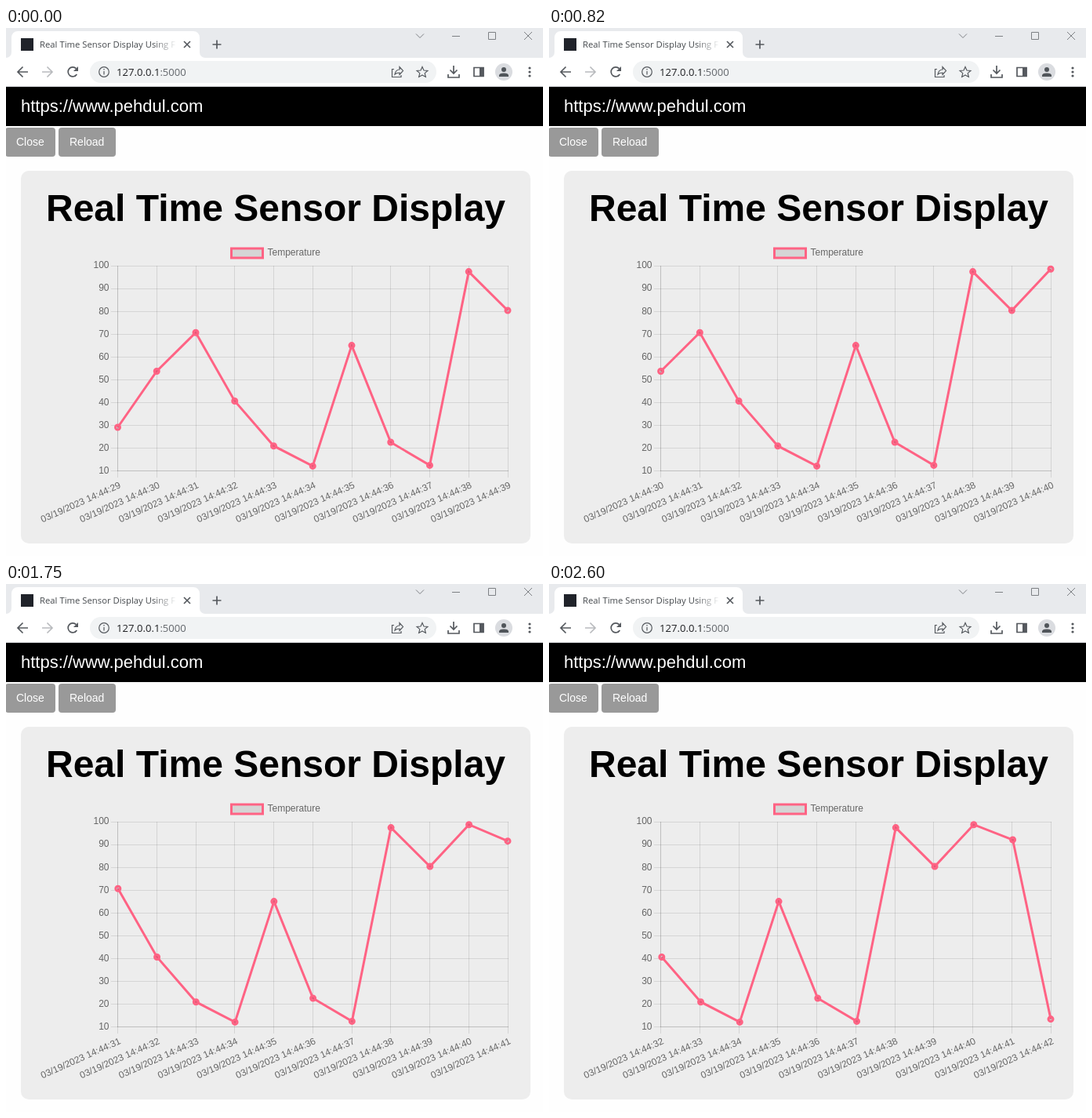
These frames come from a looping animation (685 by 673 pixels, 2.68 s). An HTML page:

```html
<!DOCTYPE html>
<html lang="en">
<head>
<meta charset="utf-8">
<title>Real Time Sensor Display</title>
<style>
  html, body { margin: 0; width: 100%; height: 100%; overflow: hidden; background: #fefefe; }
  svg { display: block; font-family: "Liberation Sans", Arial, sans-serif; }
  .ui { font-family: "Open Sans", "Noto Sans", sans-serif; }
  .icon { fill: none; stroke: #55595e; stroke-width: 1.7; }
  .fine { stroke-width: 1.2; }
  .thin { fill: none; stroke: #7d8084; stroke-width: 1; }
  .btn { font-size: 14px; fill: #fff; }
  .small { font-size: 12px; fill: #666; }
  .end { text-anchor: end; }
  #grid path { stroke: #000; stroke-opacity: .1; fill: none; }
  #line { fill: none; stroke: #ff6384; stroke-width: 3; }
  #dots circle { fill: rgba(0, 0, 0, .1); stroke: #ff6384; stroke-width: 3; }
</style>
</head>
<body>
<svg width="685" height="673" viewBox="0 0 685 673">
  <defs>
    <linearGradient id="fade" gradientUnits="userSpaceOnUse" x1="188" x2="218" y1="0" y2="0">
      <stop offset="0" stop-color="#45494d"/>
      <stop offset="1" stop-color="#45494d" stop-opacity="0"/>
    </linearGradient>
    <clipPath id="face"><circle cx="635" cy="56" r="11"/></clipPath>
  </defs>

  <!-- Tab strip -->
  <rect width="685" height="38" fill="#e8eaed"/>
  <path d="M0 38a7 7 0 0 0 7-7V12a8 8 0 0 1 8-8H239a8 8 0 0 1 8 8V31a7 7 0 0 0 7 7Z" fill="#fff"/>
  <rect x="19" y="13" width="16" height="16" fill="#20232a"/>
  <text class="ui" x="43" y="25" font-size="11.3" fill="url(#fade)">Real Time Sensor Display Using F</text>
  <path class="icon" d="M227 17l8 8m0-8l-8 8M263.500 21h11m-5.500-5.500v11"/>
  <path class="thin" d="M523 7.500l5 5 5-5M569 10.500h10M615.500 5.500h9v9h-9ZM661 5l10 10m0-10l-10 10"/>

  <!-- Toolbar -->
  <rect y="38" width="685" height="37" fill="#fff"/>
  <rect y="74" width="685" height="1" fill="#dadce0"/>
  <path class="icon" d="M28 56H15m6.500-6.500L15 56l6.500 6.500"/>
  <path class="icon" style="stroke:#b9bbbe" d="M46 56h13m-6.500-6.500L59 56l-6.500 6.500"/>
  <path class="icon" d="M90.300 59a6 6 0 1 1-.8-7.300"/>
  <path d="M92 49v6h-6Z" fill="#55595e"/>
  <rect x="107" y="42" width="442" height="28" rx="14" fill="#f1f3f4"/>
  <circle class="icon fine" cx="125" cy="56" r="6.300"/>
  <path class="icon fine" d="M125 55v4.500m0-7.500v1.600"/>
  <text class="ui" x="141" y="61" font-size="13.1" fill="#202124">127.0.0.1<tspan fill="#63676c">:5000</tspan></text>
  <path class="icon fine" d="M495 52.500h-2.500v10h11.500V60M496 59q1-6 6-6v-3.500l4.500 5-4.500 5V57q-4 0-6 2Z"/>
  <path class="icon fine" d="M531 49.500l2 4.500 4.900.4-3.700 3.200 1.100 4.800-4.300-2.500-4.300 2.500 1.100-4.800-3.700-3.200 4.900-.4Z"/>
  <path class="icon" d="M571 48v10m-4.500-4.500l4.500 4.500 4.500-4.500M564 59v4h14v-4"/>
  <path class="icon" d="M597 50.500h12v11h-12Z"/>
  <path d="M604 50h5.500v12H604Z" fill="#55595e"/>
  <circle cx="635" cy="56" r="11" fill="#dadce0"/>
  <g fill="#50555a" clip-path="url(#face)">
    <circle cx="635" cy="53" r="3"/>
    <path d="M629 62v-1.500q0-3 6-3t6 3V62Z"/>
  </g>
  <g fill="#55595e">
    <circle cx="668" cy="51" r="1.600"/><circle cx="668" cy="56" r="1.600"/><circle cx="668" cy="61" r="1.600"/>
  </g>

  <!-- Page -->
  <rect y="75" width="685" height="50"/>
  <text x="19" y="107" font-size="22" fill="#fff">https://www.pehdul.com</text>
  <rect x="-1" y="127" width="64" height="37" rx="4" fill="#999"/>
  <rect x="67" y="127" width="73" height="37" rx="4" fill="#999"/>
  <text class="btn" x="13" y="150">Close</text>
  <text class="btn" x="81" y="150">Reload</text>
  <rect x="19" y="182" width="650" height="475" rx="10" fill="#ededed"/>
  <text x="344" y="246" font-size="48" font-weight="bold" text-anchor="middle">Real Time Sensor Display</text>

  <!-- Chart -->
  <rect x="287.500" y="281" width="40" height="12" fill="#d5d5d5" stroke="#ff6384" stroke-width="3"/>
  <text class="small" x="333.500" y="290">Temperature</text>
  <g id="grid"></g>
  <g id="labels"></g>
  <polyline id="line"/>
  <g id="dots"></g>
</svg>
<script>
  const LOOP = 2680, EASE = 1000;
  const LEFT = 142.5, RIGHT = 640, TOP = 302.4, BASE = 564.3;
  const COUNT = 11, STEP = (RIGHT - LEFT) / (COUNT - 1);
  const heights = [509, 437.5, 388.3, 475.5, 532.7, 558.4, 404.6, 528, 557.4, 310.6, 360, 306.7, 326, 554.3];
  const arrivals = [36, 1038, 2003];
  // Screen refresh times: the picture holds between them
  const ticks = Array.from({ length: 35 }, (_, i) =>
    10 * (i < 9 ? Math.floor(7.375 * i) : Math.ceil(66 + 7.755 * (i - 9))));

  const $ = id => document.getElementById(id);
  const add = (parent, tag, attrs, text = '') => {
    const el = document.createElementNS('http://www.w3.org/2000/svg', tag);
    for (const key in attrs) el.setAttribute(key, attrs[key]);
    el.textContent = text;
    return parent.appendChild(el);
  };
  const gridLine = d => add($('grid'), 'path', { d });

  for (let i = 0; i < 10; i++) {
    const y = TOP + i * 29.08;
    gridLine(`M134 ${Math.round(y + .3) + .5}H641`);
    add($('labels'), 'text', { class: 'small end', x: 131.5, y: Math.round(y) + 4 }, 100 - 10 * i);
  }
  const labels = [], dots = [];
  for (let i = 0; i < COUNT; i++) {
    const x = LEFT + i * STEP;
    gridLine(`M${Math.floor(x) + .5} 303V573`);
    labels.push(add($('labels'), 'text', {
      class: 'small end', y: 11.2, transform: `translate(${x} ${BASE + 11}) rotate(-24.1)`
    }));
    dots.push(add($('dots'), 'circle', { r: 3 }));
  }
  gridLine('M142.5 303V565');
  gridLine('M142 564.5H641');

  let shown = -1;
  function draw(time) {
    const shift = arrivals.filter(a => a <= time).length;
    const rest = shift ? Math.max(0, 1 - (time - arrivals[shift - 1]) / EASE) ** 4 : 0;
    const points = dots.map((dot, i) => {
      const newest = i === COUNT - 1;
      const x = LEFT + STEP * (newest ? i : i + rest);
      const end = heights[shift + i];
      const y = newest ? end + (BASE - end) * rest : end;
      dot.setAttribute('cx', x);
      dot.setAttribute('cy', y);
      labels[i].textContent = `03/19/2023 14:44:${29 + shift + i}`;
      return `${x},${y}`;
    });
    $('line').setAttribute('points', points.join(' '));
  }

  const begin = performance.now();
  function frame() {
    const time = (performance.now() - begin) % LOOP;
    const held = Math.max(...ticks.filter(t => t <= time));
    if (held !== shown) draw(shown = held);
    requestAnimationFrame(frame);
  }
  frame();
</script>
</body>
</html>
```
